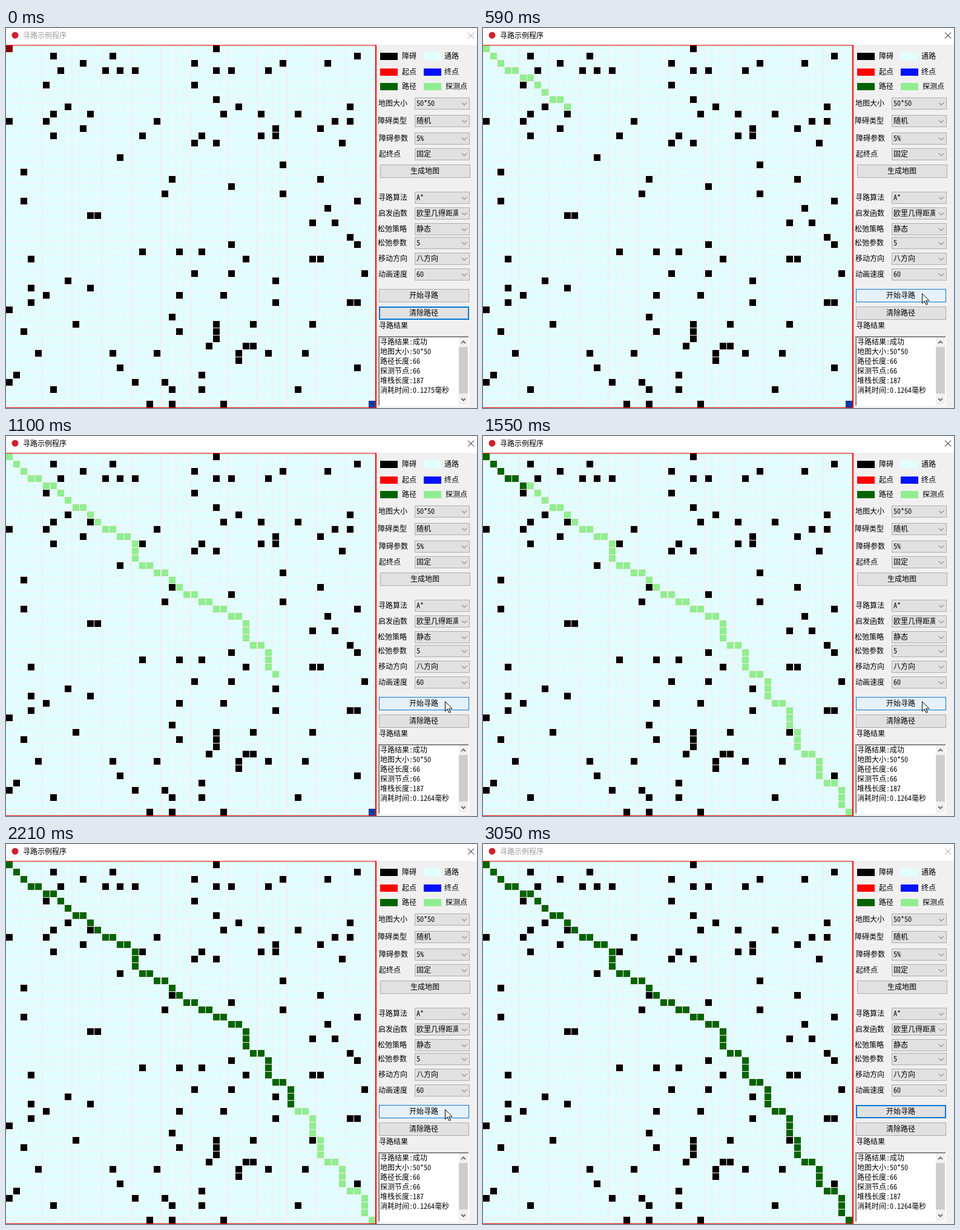
Animation of 778x629 px, one loop 3110 ms. Source, as an HTML page:

```html
<!DOCTYPE html>
<html lang="zh-CN">
<head>
<meta charset="utf-8">
<title>寻路示例程序</title>
<style>
html, body { margin: 0; width: 100%; height: 100%; overflow: hidden; background: #f0f0f0; }
svg { display: block; shape-rendering: crispEdges; }
text { font: 12px "Noto Sans Mono CJK SC", "Noto Sans CJK SC", "Noto Sans CJK", monospace; white-space: pre; }
.smooth { shape-rendering: auto; }
</style>
</head>
<body>
<svg id="stage" width="778" height="629" viewBox="0 0 778 629">
  <defs><clipPath id="comboClip"><rect x="676" y="100" width="71" height="330"/></clipPath></defs>
</svg>
<script>
const LOOP = 3110, COLS = 50, PITCH_X = 12.24, PITCH_Y = 12, TOP = 29, CELL = 11;
const FREE = '#e0ffff', GRID = '#f8edf2', SEEN = '#90ee90', PATH = '#006400';
const START = '#800000', GOAL = '#003da0', BLUE = '#0078d7';

// Obstacle columns, row by row
const OBSTACLES = [
  [28], [6,14,47], [10,25,37,43], [7,13,15,17,28,30,35], [], [5,25], [], [28], [8,31,46], [6,11,29,34,39],
  [0,5,20,44,46], [10,36,42], [6,18,26,34,36], [25,28,45], [], [15], [37], [2], [22,42], [30],
  [21,37], [2,47], [43], [11,12], [41,44], [], [46], [30,47], [18,23,26], [3,32,41,42],
  [], [25,30,48], [8,36], [3,11], [5,23,29], [3,36,46,47], [0], [22], [9,28,33,41], [2,23,28],
  [28], [27,32,33], [4,14,20,31,35,40], [31], [15,47], [1,26], [0,17,21], [6,22,26,39], [], [19,22,29]
];

// Route moves: d = diagonal, r = right, s = down
const MOVES = 'dddrdrdddrdddrdrdssdrdrdddrdrdrdrdssdrdssdrdssdrdssdssdrdssdrdssd';

// Time -> cells coloured so far (first pass: explored, second pass: route)
const PROGRESS = [[410,1], [590,12], [830,27], [1100,43], [1130,46], [1550,72], [1670,80], [2210,113], [2540,132]];

const stage = document.getElementById('stage');

function add(tag, attrs, parent = stage) {
  const node = document.createElementNS('http://www.w3.org/2000/svg', tag);
  set(node, attrs);
  parent.append(node);
  return node;
}
function set(node, attrs) {
  for (const key in attrs) node.setAttribute(key, attrs[key]);
}
function rect(x, y, width, height, fill) {
  return add('rect', { x, y, width, height, fill });
}
function label(x, middle, content, attrs = {}) {
  const node = add('text', { x, y: middle + 4, ...attrs });
  node.textContent = content;
  return node;
}
function line(d, stroke, width = 1) {
  return add('path', { d, stroke, fill: 'none', 'stroke-width': width, class: 'smooth' });
}
function cell(col, row, fill) {
  return rect(Math.floor(col * PITCH_X), TOP + row * PITCH_Y, CELL, CELL, fill);
}
function button(x, y, caption) {
  const edge = rect(x, y, 149, 22), face = rect(x, y, 149, 22);
  label(x + 74, y + 11, caption, { 'text-anchor': 'middle' });
  const style = (fill, stroke, w = 1) => {
    set(edge, { fill: stroke });
    set(face, { fill, x: x + w, y: y + w, width: 149 - 2 * w, height: 22 - 2 * w });
  };
  style('#e1e1e1', '#adadad');
  return style;
}

// Title bar
rect(0, 0, 778, 28, '#fff');
add('circle', { cx: 15, cy: 12, r: 5.5, fill: '#d0202c', class: 'smooth' });
const title = label(28, 13, '寻路示例程序');
const closeMark = line('M763 7.5L773 17.5M773 7.5L763 17.5', '#000');

// Map
rect(0, 28, 612, 601, FREE);
for (let i = 0; i < COLS; i++) {
  const x = Math.floor(i * PITCH_X) + CELL;
  rect(x, TOP, Math.floor((i + 1) * PITCH_X) - x, 599, GRID);
  rect(0, TOP + i * PITCH_Y + CELL, 612, 1, GRID);
}
OBSTACLES.forEach((cols, row) => cols.forEach(col => cell(col, row, '#000')));
let col = 0, row = 0;
const route = [cell(0, 0, START)];
for (const move of MOVES) {
  if (move !== 's') col++;
  if (move !== 'r') row++;
  route.push(cell(col, row, 'none'));
}
rect(0, 28, 612, 1, '#f00');
rect(0, 628, 612, 1, '#f00');
rect(610, 28, 2, 601, '#f00');

// Legend
[['#000', '障碍', FREE, '通路', 47, 724], ['#f00', '起点', '#000fff', '终点', 73, 724],
 [PATH, '路径', SEEN, '探测点', 97, 726]].forEach(([c1, name1, c2, name2, y, x2]) => {
  rect(618, y - 6, 29, 12, c1);
  rect(690, y - 6, 29, 12, c2);
  label(654, y, name1);
  label(x2, y, name2);
});

// Settings
[['地图大小', 615, 125, '50*50'], ['障碍类型', 614, 154, '随机'], ['障碍参数', 616, 183, '5%'],
 ['起终点', 616, 209, '固定'], ['寻路算法', 615, 281, 'A*'], ['启发函数', 615, 307, '欧里几得距离'],
 ['松弛策略', 614, 333, '静态'], ['松弛参数', 614, 356, '5'], ['移动方向', 615, 382, '八方向'],
 ['动画速度', 615, 408, '60']].forEach(([name, x, y, value]) => {
  label(x, y, name);
  rect(675, y - 10, 91, 20, '#adadad');
  rect(676, y - 9, 89, 18, '#e1e1e1');
  label(678, y, value, { 'clip-path': 'url(#comboClip)' });
  line(`M753 ${y - 1.5}l4 4l4 -4`, '#555');
});
button(618, 226, '生成地图');
const startButton = button(616, 432, '开始寻路');
const clearButton = button(616, 461, '清除路径');
label(616, 493, '寻路结果');

// Result list
rect(615, 510, 150, 116, '#fff');
rect(615, 510, 149, 115, '#a0a0a0');
rect(616, 511, 148, 114, '#696969');
rect(617, 512, 147, 113, '#fff');
rect(748, 512, 15, 112, '#f0f0f0');
rect(748, 528, 15, 77, '#cdcdcd');
line('M752 522l3.5 -3.5l3.5 3.5M752 613l3.5 3.5l3.5 -3.5', '#505050', 1.6);
const results = ['寻路结果:成功', '地图大小:50*50', '路径长度:66', '探测节点:66', '堆栈长度:187', '']
  .map((content, i) => label(618, 520 + 16 * i, content));

// Pointer
const halo = add('circle', { cx: 726, cy: 440, r: 12, fill: '#fff000', 'fill-opacity': 0.55, class: 'smooth' });
const pointer = add('path', {
  d: 'M.5 .5V16.5L4.2 13L7 19L9.3 18L6.6 12.2H11.8Z', fill: '#fff', stroke: '#000', class: 'smooth'
});

const clamp = v => Math.max(0, Math.min(1, v));
const hold = (t, from) => from + Math.floor((t - from) / 30) * 30;

function mix(a, b, p) {
  return `rgb(${a.map((v, i) => Math.round(v + (b[i] - v) * clamp(p)))})`;
}
function cellsDone(t) {
  if (t < 410) return 0;
  const time = hold(t, 410);
  const i = PROGRESS.findIndex(step => step[0] > time);
  if (i < 0) return 132;
  const [t0, n0] = PROGRESS[i - 1], [t1, n1] = PROGRESS[i];
  return Math.floor(n0 + (n1 - n0) * (time - t0) / (t1 - t0) + 1e-6);
}
function pointerAt(t) {
  if (t < 70 || t >= 2760) return null;
  if (t < 280) {
    const left = (1 - (hold(t, 70) - 70) / 210) ** 2;
    return [725 + 16 * left, 439 + 158 * left];
  }
  if (t < 2670) return [725, 439];
  return t < 2700 ? [734, 474] : t < 2730 ? [748, 545] : [760, 612];
}

const NORMAL = [225, 225, 225], HOVER = [229, 241, 251], PRESSED = [204, 228, 247];
const GREY_EDGE = [173, 173, 173], BLUE_EDGE = [0, 120, 215], DEEP_EDGE = [0, 84, 153];

function styleStart(t) {
  if (t < 280) {
    const p = (t - 190) / 90;
    startButton(mix(NORMAL, HOVER, p), mix(GREY_EDGE, BLUE_EDGE, p));
  } else if (t < 410) {
    const p = (t - 280) / 60;
    startButton(mix(HOVER, PRESSED, p), mix(BLUE_EDGE, DEEP_EDGE, p));
  } else if (t < 2670) {
    const p = (t - 400) / 120;
    startButton(mix(PRESSED, HOVER, p), mix(DEEP_EDGE, BLUE_EDGE, p));
  } else {
    startButton(mix(HOVER, NORMAL, (t - 2660) / 90), BLUE, 2);
  }
}

function draw(t) {
  const done = cellsDone(t), last = route.length - 1;
  route.forEach((node, i) => {
    const idle = i === 0 ? START : i === last ? GOAL : 'none';
    set(node, { fill: done > i + route.length ? PATH : done > i ? SEEN : idle });
  });

  const active = t >= 280 && t < 3050;
  set(title, { fill: active ? '#000' : '#999' });
  set(closeMark, { stroke: active ? '#000' : '#999' });
  results[5].textContent = `消耗时间:${t < 410 ? '0.1275' : '0.1264'}毫秒`;

  styleStart(t);
  if (t < 280) clearButton('#e1e1e1', BLUE, 2);
  else clearButton('#e1e1e1', '#adadad');

  const spot = pointerAt(t);
  set(pointer, { visibility: spot ? 'visible' : 'hidden' });
  if (spot) set(pointer, { transform: `translate(${spot.map(Math.round)})` });
  set(halo, { visibility: t >= 280 && t < 410 ? 'visible' : 'hidden' });
}

const began = performance.now();
function tick() {
  draw((performance.now() - began) % LOOP);
  requestAnimationFrame(tick);
}
tick();
</script>
</body>
</html>
```
